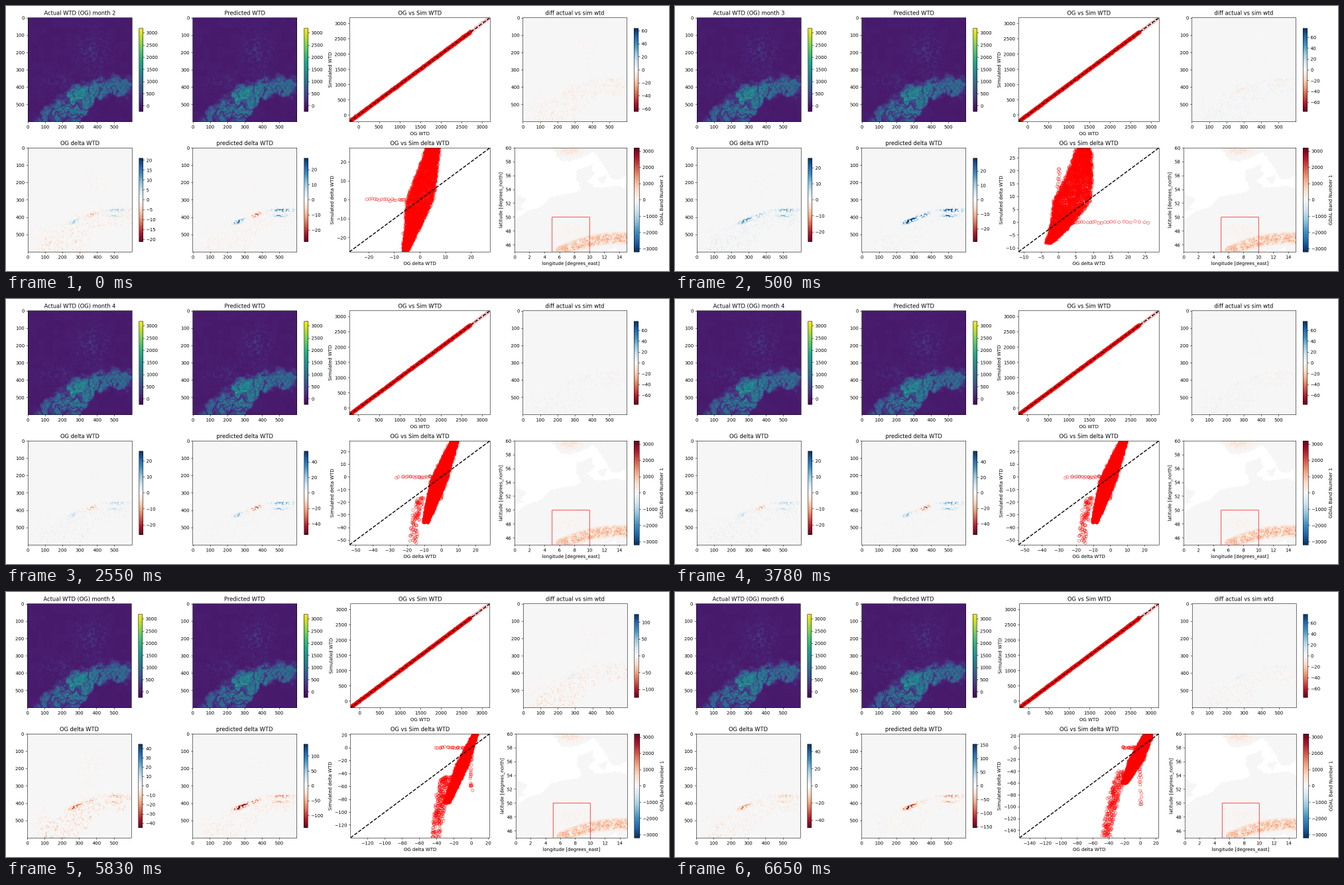
These frames come from a looping animation (1000 px wide and 400 px high, 8 s). A matplotlib script:

```python
import numpy as np
import matplotlib.pyplot as plt
from matplotlib.animation import FuncAnimation
from matplotlib.path import Path

W, H, DPI = 1000, 400, 50
STEP, LOOP = 50, 8000
FIRST, HOLD = 500, 2050
N = 600
WTD = dict(cmap="viridis", vmin=-225, vmax=3190)

fig = plt.figure(figsize=(W / DPI, H / DPI), dpi=DPI)
yy, xx = np.mgrid[0:N, 0:N].astype(float)


def noise(x, y, seed):
    """Smooth value noise in 0..1, one lattice cell per unit."""
    g = np.random.default_rng(seed).random((64, 64))
    i, j = np.floor(x).astype(int), np.floor(y).astype(int)
    u, v = x - i, y - j
    u, v = u * u * (3 - 2 * u), v * v * (3 - 2 * v)

    def at(a, b):
        return g[(j + b) % 64, (i + a) % 64]

    return ((at(0, 0) * (1 - u) + at(1, 0) * u) * (1 - v)
            + (at(0, 1) * (1 - u) + at(1, 1) * u) * v)


def ridges(x, y, seed):
    """Branching valleys: 0 on the valley floor, 1 on the slopes."""
    wx = x + 1.1 * noise(x * 1.7, y * 1.7, seed + 1)
    wy = y + 1.1 * noise(x * 1.7, y * 1.7, seed + 2)
    return np.clip(np.abs(2 * noise(wx, wy, seed) - 1) * 4, 0, 1)


def bump(x, y, cx, cy, sx, sy):
    return np.exp(-((x - cx) / sx) ** 2 - ((y - cy) / sy) ** 2)


def mountain_belt():
    upper = 322 + 290 * np.clip(1 - xx / 500, 0, 1) ** 2
    lower = 462 + 0.0063 * np.clip(460 - xx, 0, None) ** 2
    rough = 44 * (noise(xx / 26, yy / 26, 5) - 0.5)
    return (np.clip((yy - upper + rough) / 45, 0, 1)
            * np.clip((lower - yy + rough) / 25, 0, 1))


def terrain():
    big, small = ridges(xx / 40, yy / 40, 11), ridges(xx / 17, yy / 17, 21)
    grain = noise(xx / 4, yy / 4, 31)
    core = bump(xx, yy, 290, 465, 130, 80)
    z = (250 + 600 * small + 500 * grain) * (0.1 + 0.9 * big) * (0.85 + 0.4 * core)
    z += 900 * core * big * np.clip(4 * noise(xx / 14, yy / 14, 8) - 2.9, 0, 1)
    hills = bump(xx, yy, 370, 200, 90, 110) + 0.6 * bump(xx, yy, 190, 370, 130, 60)
    flat = 10 + 30 * noise(xx / 40, yy / 40, 51) + 420 * hills * noise(xx / 12, yy / 9, 41) ** 3
    return z * BELT + flat * (1 - BELT)


def spots(west, mid, east):
    """Blotchy chain climbing to the right, then two short rows beside it."""
    u = np.clip((xx - 250) / 130, 0, 1)
    chain = np.exp(-((xx - 312) / 74) ** 6 - ((yy - 432 + 52 * u) / 11) ** 2)
    rows = bump(xx, yy, 525, 360, 65, 9) + 0.8 * bump(xx, yy, 505, 391, 40, 8)
    blot = np.clip(noise(xx / 6, yy / 5, 91) * 5 - 2.2, 0, 1)
    return 1.5 * blot * (chain * (west + (mid - west) * u) + rows * east)


def haze(seed, tone):
    rng = np.random.default_rng(seed)
    area = BELT + 0.6 * bump(xx, yy, 100, 520, 70, 80) + 0.3 * bump(xx, yy, 370, 200, 90, 110)
    patch = np.clip(noise(xx / 9, yy / 7, seed) * 3 - 1, 0, 1)
    sparse = noise(xx / 4, yy / 4, seed + 1) > 0.62
    return area * patch * sparse * (tone + rng.normal(0, 0.6, xx.shape))


COAST = [
    [(0, 45), (0, 49.6), (1.6, 50.9), (3.5, 51.5), (4.8, 53), (8.2, 53.6), (8.8, 54.1),
     (8.2, 55.5), (8.2, 56.8), (10.5, 57.7), (10.3, 56.9), (10.9, 56.4), (9.7, 55.2),
     (11, 54.3), (13.5, 54.6), (15, 54.2), (15, 45), (13.7, 45), (13.6, 45.7), (12.3, 45)],
    [(0, 50.7), (1.4, 51.2), (0.8, 51.5), (1.7, 52.6), (0, 53.6)],
    [(4.9, 60), (6, 58.2), (7, 58), (8.5, 58.3), (10.6, 59.4), (13, 55.4), (14.2, 55.5),
     (15, 56.1), (15, 60)],
    [(11, 55.7), (12.4, 56.1), (12, 54.8), (11.2, 55.2)],
]


def continent():
    lat, lon = np.mgrid[60:45:360j, 0:15:360j]
    jit = 0.25 * (noise(lon * 4, lat * 4, 61) - 0.5)
    pts = np.c_[(lon + jit).ravel(), (lat + jit).ravel()]
    land = np.any([Path(ring).contains_points(pts) for ring in COAST], axis=0)
    axis = 46.95 - 0.03 * np.clip(14 - lon, 0, None) ** 2
    arc = np.clip(2.2 - 2.2 * np.abs(lat - axis), 0, 1) * (lon > 5.5)
    z = arc * ridges(lon * 2, lat * 2.4, 71) * (200 + 1400 * noise(lon * 10, lat * 10, 75))
    z += 800 * bump(lon, lat, 7.4, 59.8, 1.6, 0.8) * noise(lon * 6, lat * 6, 81)
    z += 160 * bump(lon, lat, 8, 48, 3, 1.4) * noise(lon * 5, lat * 5, 82)
    return np.where(land.reshape(lat.shape), z, np.nan)


BELT = mountain_belt()
TERRAIN = terrain()
CONTINENT = continent()

# limits: colour range of the diff, OG and predicted maps; spots: west, mid, east
# body and strand: start, control and end of a curve with its half widths
MONTHS = [
    dict(limits=(64, 21, 27.5), spots=(.8, -.9, .6), tone=-.4, lim=(-27.5, 27.4),
         body=[(-5.8, -28), (.4, 0), (5.2, 28)], widths=(.7, 5.2, 2.4), row=-20.7, col=-15),
    dict(limits=(77, 26, 28.8), spots=(.9, .7, .8), tone=.2, lim=(-11.5, 28.9),
         body=[(-2.8, -8), (5.5, 6), (7.2, 29)], widths=(.8, 5.3, 2), row=26, col=21),
    dict(limits=(77, 26, 54), spots=(.5, -.9, .45), tone=.05, lim=(-53.7, 28.5),
         body=[(-9, -36), (-2, -3), (8, 29)], widths=(1.3, 4.6, 1.7), row=-26, col=-18,
         strand=[(-12, -16), (-16, -32), (-16, -53)], spread=2),
    dict(limits=(124, 44.5, 140), spots=(-.9, -.5, -.4), tone=-.6, lim=(-139.9, 21.6),
         body=[(-28, -86), (-10, -25), (5, 21)], widths=(2.5, 6.2, 1.5), row=-41.5, col=-66,
         strand=[(-28, -45), (-36, -75), (-41, -140)], spread=6),
    dict(limits=(76, 48.5, 152.5), spots=(-.8, -.1, -.4), tone=-.2, lim=(-152.8, 23.5),
         body=[(-20, -60), (-4, -20), (10, 21)], widths=(2.5, 8, 5), row=-23, col=-98,
         strand=[(-22, -40), (-34, -75), (-43, -152)], spread=6),
]


def along(rng, curve, widths, n):
    """Random points around a quadratic curve."""
    a, b, c = np.array(curve, float)
    t = rng.random((n, 1))
    p = (1 - t) ** 2 * a + 2 * t * (1 - t) * b + t ** 2 * c
    half = np.interp(t[:, 0], np.linspace(0, 1, len(widths)), widths)
    p[:, 0] += half * rng.uniform(-1, 1, n)
    return p


def delta_points(rng, m):
    span = m["lim"][1] - m["lim"][0]
    tail = m["row"] * np.linspace(0, 1, 40) ** 2
    drop = m["col"] * rng.random(30)
    parts = [along(rng, m["body"], m["widths"], 4000),
             np.c_[tail, rng.normal(0, span * 0.003, tail.size)],
             np.c_[rng.normal(0, span * 0.003, drop.size), drop]]
    if "strand" in m:
        parts.append(along(rng, m["strand"], [m["spread"]], 50 * int(m["spread"])))
    pts = np.vstack(parts)
    return pts + rng.normal(0, span * 0.004, pts.shape)


def level_points(rng):
    x = np.r_[rng.uniform(-215, 2720, 4000), np.linspace(2740, 3165, 9)]
    return np.c_[x, x + rng.normal(0, 12, x.size)]


def field(ax, data, title, **style):
    fig.colorbar(ax.imshow(data, **style), ax=ax, shrink=0.8)
    ax.set_title(title)


def compare(ax, pts, lim, name):
    ax.scatter(*pts.T, s=36, facecolors="none", edgecolors="r", linewidths=1, alpha=0.65)
    ax.plot(lim, lim, "k--", lw=2)
    ax.set(xlim=lim, ylim=lim, title=f"OG vs Sim {name}",
           xlabel=f"OG {name}", ylabel=f"Simulated {name}")


def region(ax):
    im = ax.imshow(CONTINENT, cmap="RdBu_r", vmin=-3200, vmax=3200,
                   extent=(0, 15, 45, 60), aspect="auto")
    ax.add_patch(plt.Rectangle((5, 45), 5, 5, fill=False, ec="r"))
    ax.set(xlabel="longitude [degrees_east]", ylabel="latitude [degrees_north]",
           xticks=range(0, 15, 2), yticks=range(46, 61, 2))
    fig.colorbar(im, ax=ax, label="GDAL Band Number 1")


def render(k, m):
    """Draw one month at double size and average it down."""
    fig.clear()
    rng = np.random.default_rng(100 + k)
    axes = fig.subplots(2, 4)
    # wide minus signs on the axis labels push the columns apart
    left, gap = (20.9, 39.3) if m["lim"][0] < -100 else (20.2, 37)
    col = (979 - left - 3 * gap) / 4
    fig.subplots_adjust(left=left / W, right=0.979, wspace=gap / col, hspace=39.3 / 157,
                        top=1 - 17.7 / H, bottom=1 - 371 / H)

    field(axes[0, 0], TERRAIN, f"Actual WTD (OG) month {k + 2}", **WTD)
    field(axes[0, 1], TERRAIN, "Predicted WTD", **WTD)
    compare(axes[0, 2], level_points(rng), (-218, 3190), "WTD")
    maps = [(axes[0, 3], "diff actual vs sim wtd", -0.12, 0.3),
            (axes[1, 0], "OG delta WTD", 0.55, 0.4),
            (axes[1, 1], "predicted delta WTD", 1, 0.2)]
    for i, (ax, title, gain, mist) in enumerate(maps):
        lim = m["limits"][i]
        data = gain * spots(*m["spots"]) + mist * haze(200 + 10 * k + 3 * i, m["tone"])
        field(ax, lim * data, title, cmap="RdBu", vmin=-lim, vmax=lim)
    compare(axes[1, 2], delta_points(rng, m), m["lim"], "delta WTD")
    region(axes[1, 3])

    fig.canvas.draw()
    px = np.asarray(fig.canvas.buffer_rgba())[..., :3].astype(float)
    return px.reshape(H, 2, W, 2, 3).mean((1, 3)).round().astype(np.uint8)


fig.set_dpi(2 * DPI)
pages = [render(k, m) for k, m in enumerate(MONTHS)]
fig.clear()
fig.set_dpi(DPI)

stage = fig.add_axes([0, 0, 1, 1])
stage.axis("off")
view = stage.imshow(pages[0], aspect="auto", interpolation="nearest")


def update(i):
    view.set_data(pages[(i * STEP - FIRST) // HOLD + 1])
    return [view]


anim = FuncAnimation(fig, update, frames=LOOP // STEP, interval=STEP,
                     repeat=True, repeat_delay=0)
plt.show()
```
